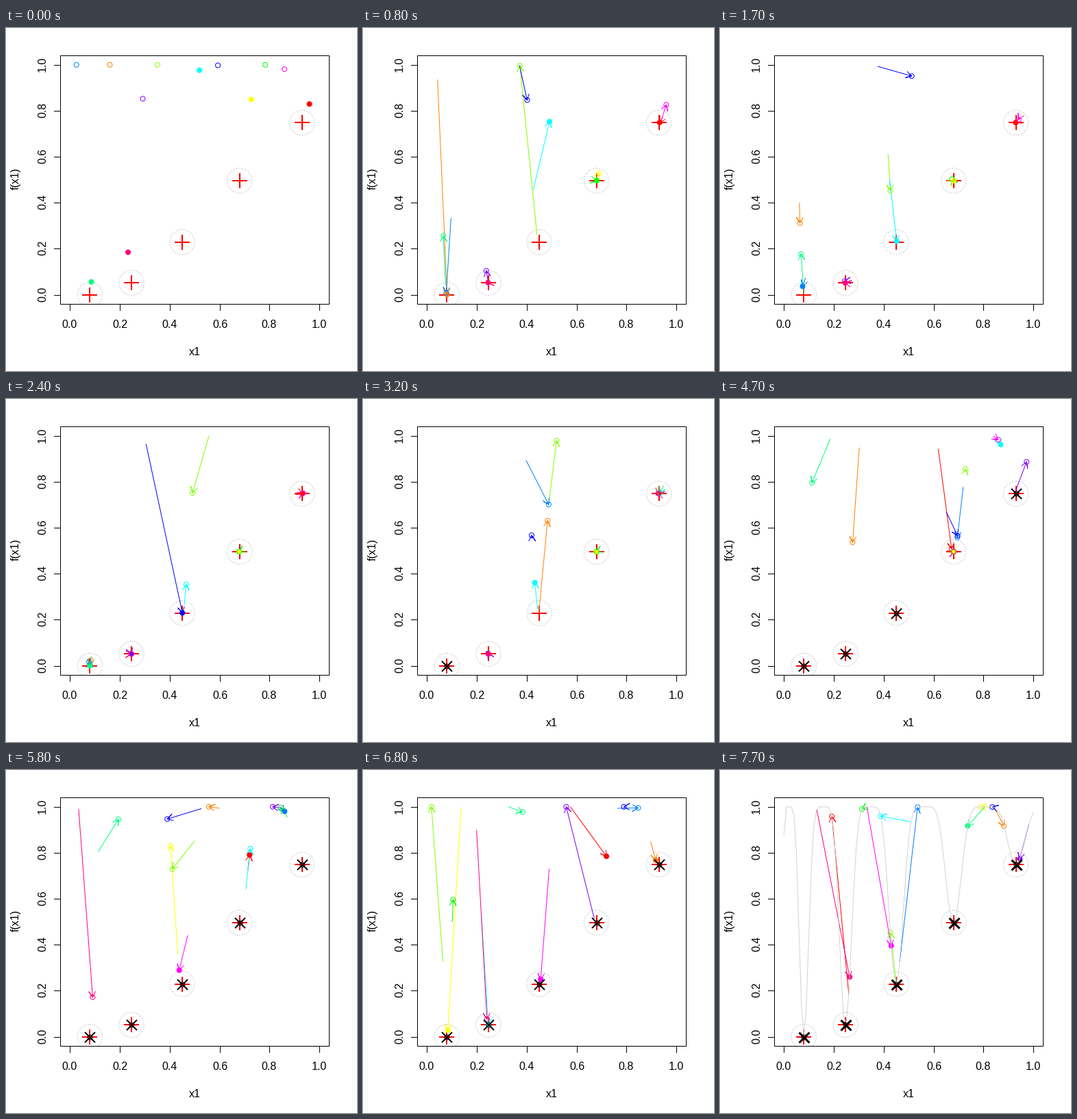
Animation, 512 px wide and 501 px high, one loop 7.8 s. Source, as a matplotlib script:

```python
import colorsys

import numpy as np
import matplotlib.pyplot as plt
from matplotlib.animation import FuncAnimation
from matplotlib.collections import LineCollection
from matplotlib.patches import Circle, Rectangle

W, H, DPI = 512, 501, 64
PX = 72 / DPI  # points per pixel
FRAMES, STEP_MS = 78, 100
LEFT, RIGHT, TOP, BOTTOM = 79, 471, 40, 403
START = [.960, .160, .727, .351, .783, .086, .519, .026, .593, .292, .860, .233]
N = len(START)
COLORS = [colorsys.hsv_to_rgb(i / N, 1, 1) for i in range(N)]
RADIUS = 0.1   # species radius
NEAR = 0.012   # distance at which a known optimum scatters its species
OPTIMA = np.array([0.08, 0.247, 0.45, 0.68, 0.93])
FOUND_AT = np.array([29, 36, 41, 51, 44])


def f(x):
    x = np.asarray(x, float)
    bell = np.exp(-2 * np.log(2) * ((x - 0.08) / 0.854) ** 2)
    return 1 - bell * np.sin(5 * np.pi * (x ** 0.75 - 0.05)) ** 6


def to_px(x):
    return np.column_stack([93.27 + 363.85 * x, 389.64 - 335.89 * f(x)])


def species(x):
    """Index of the leader of each particle, best particles first."""
    lead = np.full(N, -1)
    for i in np.argsort(f(x)):
        if lead[i] < 0:
            lead[(lead < 0) & (abs(x - x[i]) <= RADIUS)] = i
    return lead


def simulate():
    """Species-based particle swarm: list of (position, previous position)."""
    rng = np.random.default_rng(5)
    x = best = np.array(START)
    v = np.zeros(N)
    steps = [(x, x)]
    for t in range(1, FRAMES):
        lead = species(x)
        r1, r2 = rng.random((2, N))
        v = 0.73 * (v + 2.05 * r1 * (best - x) + 2.05 * r2 * (best[lead] - x))
        prev, x = x, np.clip(x + v, 0, 1)
        best = np.where(f(x) < f(best), x, best)

        known = OPTIMA[FOUND_AT <= t]
        done = (abs(prev[lead][:, None] - known) < NEAR).any(axis=1)
        fresh, kick = rng.random(N), rng.normal(0, 0.06, N)
        x = np.where(done, fresh, x)
        best = np.where(done, fresh, best)
        v = np.where(done, kick, v)
        prev = np.where(done, np.clip(fresh - kick, 0, 1), prev)
        steps.append((x, prev))
    return steps


def arrow(tail, tip, head=9.6, angle=np.pi / 6):
    d = tail - tip
    if np.hypot(*d) < 0.1:
        return np.array([tip, tip])
    a = np.arctan2(d[1], d[0])
    barbs = [tip + head * np.array([np.cos(a + s), np.sin(a + s)])
             for s in (-angle, angle)]
    return np.array([tail, tip, barbs[0], tip, barbs[1]])


plt.rcParams["font.family"] = "Liberation Sans"
fig = plt.figure(figsize=(W / DPI, H / DPI), dpi=DPI, facecolor="white")
ax = fig.add_axes([0, 0, 1, 1])
ax.set_xlim(0, W)
ax.set_ylim(H, 0)
ax.axis("off")

box = Rectangle((LEFT, TOP), RIGHT - LEFT, BOTTOM - TOP, fill=False,
                lw=PX, ec="black", zorder=1)
ax.add_patch(box)


def line(xs, ys, color="black", width=1, z=1):
    ax.plot(xs, ys, color=color, lw=width * PX, zorder=z,
            solid_capstyle="projecting" if width == 1 else "butt")


def label(x, y, text, rotation=0):
    ax.text(x, y, text, size=16 * PX, ha="center", va="baseline",
            rotation=rotation, rotation_mode="anchor")


for k in range(6):
    px = round(93.27 + 363.85 * k / 5)
    py = round(389.64 - 335.89 * k / 5)
    line([px, px], [BOTTOM, BOTTOM + 9])
    line([LEFT, LEFT - 9], [py, py])
    label(px, 438.5, f"{k / 5:.1f}")
    label(58, py - 1.5, f"{k / 5:.1f}", 90)
label(275, 478, "x1")
label(19, 220, "f(x1)", 90)

peaks = to_px(OPTIMA)
for cx, cy in peaks:
    ring = Circle((cx, cy), 18.2, fill=False, ec="#bebebe", lw=PX,
                  ls=(0, (1.5, 2)), zorder=2)
    ax.add_patch(ring)
    ring.set_clip_path(box)
    line([cx - 11, cx + 11], [cy, cy], "red", 2, 3)
    line([cx, cx], [cy - 11, cy + 11], "red", 2, 3)

arrows = LineCollection([], colors=COLORS, linewidths=PX, zorder=4)
ax.add_collection(arrows)
arrows.set_clip_path(box)
dots = ax.scatter(np.zeros(N), np.zeros(N), s=(7 * PX) ** 2, linewidths=PX, zorder=5)
dots.set_edgecolors(COLORS)
curve = ax.plot(*to_px(np.linspace(0, 1, 101)).T, color="#d3d3d3", lw=PX, zorder=6)[0]
rings = ax.plot([], [], "o", ms=7 * PX, mfc="none", mec="black", mew=PX, zorder=7)[0]
marks = ax.plot([], [], "x", ms=15 * PX, mec="black", mew=2 * PX, zorder=8)[0]

STEPS = simulate()


def update(t):
    x, prev = STEPS[t]
    tips = to_px(x)
    arrows.set_segments([arrow(a, b) for a, b in zip(to_px(prev), tips)])

    # leaders with followers are filled
    crowd = np.bincount(species(x), minlength=N)
    dots.set_offsets(tips)
    dots.set_facecolors([(*c, float(n > 1)) for c, n in zip(COLORS, crowd)])

    found = peaks[FOUND_AT <= t]
    for m in (rings, marks):
        m.set_data(found[:, 0], found[:, 1])
    last = t == FRAMES - 1
    marks.set_markeredgewidth((3 if last else 2) * PX)
    curve.set_visible(last)
    return arrows, dots, curve, rings, marks


anim = FuncAnimation(fig, update, frames=FRAMES, interval=STEP_MS,
                     repeat=True, repeat_delay=0, blit=False)
plt.show()
```
